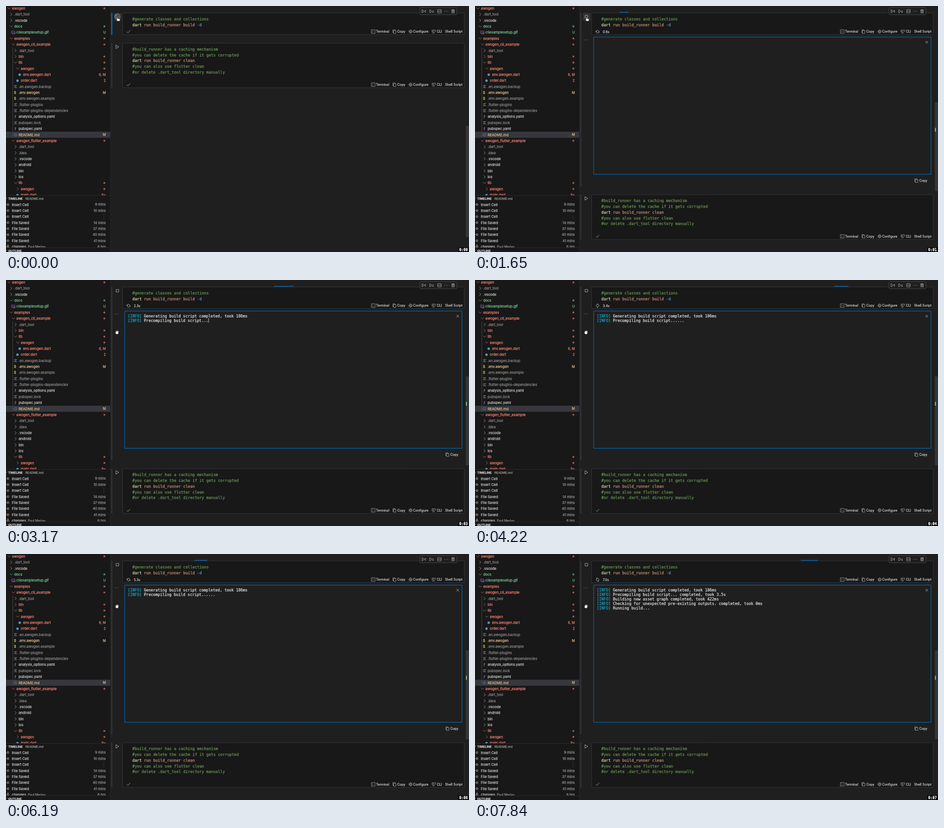
Recreate the animation shown at these times as an HTML page with a canvas. Size 1026 by 546 pixels, loop 7990 ms.

```html
<!DOCTYPE html>
<html lang="en">
<head>
<meta charset="utf-8">
<title>Notebook run</title>
<style>
html, body { margin: 0; width: 100%; height: 100%; overflow: hidden; background: #1f1f1f; }
canvas { display: block; width: 1026px; height: 546px; }
</style>
</head>
<body>
<canvas id="stage" width="1026" height="546"></canvas>
<script>
const ctx = document.getElementById('stage').getContext('2d');
const LOOP = 7990, START = 818, BAR_START = 1305;
const SANS = 'Inter, "Open Sans", sans-serif';
const MONO = '"DejaVu Sans Mono", monospace';
const FG = '#cccccc', DIM = '#8c8c8c', RED = '#f88070', GREEN = '#73c991',
  GOLD = '#e2c08d', BLUE = '#0078d4', PURPLE = '#a074c4', SIDE = '#181818', EDITOR = '#1f1f1f',
  SLIDER = '#353535';

// Icons live on a 16 unit grid.
const circle = r => `M${8 - r} 8a${r} ${r} 0 1 1 ${2 * r} 0a${r} ${r} 0 1 1 ${-2 * r} 0`;
const teeth = Array.from({ length: 8 }, (_, i) => {
  const c = Math.cos(i * Math.PI / 4), s = Math.sin(i * Math.PI / 4);
  return `M${8 + 5 * c} ${8 + 5 * s}L${8 + 7 * c} ${8 + 7 * s}`;
}).join('');
const ICONS = {
  play: 'M3.2 2L13 8L3.2 14Z',
  stop: 'M3.5 3.5h9v9h-9z',
  check: 'M2.5 8.5L6 12L13.5 3.5',
  sync: 'M2.5 8a5.5 5.5 0 0 0 10.2 2.4M.5 9.2l2-2 2 2M13.5 8a5.5 5.5 0 0 0-10.2-2.4M11.5 6.8l2 2 2-2',
  terminal: 'M1.5 1.5h13v13h-13zM5 5l3 3-3 3',
  copy: 'M5 4.5h8.5v10h-8.5zM5 12H2.5V1.5H10V4.5',
  gear: circle(2) + circle(5) + teeth,
  cli: 'M14.5 7V2.5h-13v7h6M4 6h5M3.5 13.5h4M8 13l5.5-5.5M8 13l1 1.5',
  runUp: 'M2 2.5l8 5.5-8 5.5zM13.5 13V5M11.5 7l2-2 2 2',
  runDown: 'M2 2.5l8 5.5-8 5.5zM13.5 5v8M11.5 11l2 2 2-2',
  split: 'M2 2h12v12h-12zM2 8h12',
  trash: 'M2.5 4h11M6 4V2h4v2M3.5 4v10h9V4M6.5 6.5v5M9.5 6.5v5',
  close: 'M4 4l8 8M12 4l-8 8',
  dots: 'M2.5 8h.01M8 8h.01M13.5 8h.01',
  right: 'M5.5 3l5 5-5 5',
  down: 'M3 5.5l5 5 5-5',
  info: circle(5.5) + 'M8 7.2v4M8 4.6v.6',
  lines: 'M4 4h8.5M4 8h6M4 12h8.5',
  image: 'M2 3h11v8h-11zM5 13.5h9.5v-7M4 9l3-3 3 3',
  ring: circle(3.4),
  commit: circle(3.4) + 'M8 4.6V0M8 11.4V16'
};
for (const k in ICONS) ICONS[k] = new Path2D(ICONS[k]);

function icon(name, x, y, color = FG, width = 1.3, angle = 0) {
  ctx.save();
  ctx.translate(x, y);
  ctx.rotate(angle);
  ctx.scale(.607, .607);
  ctx.translate(-8, -8);
  ctx.strokeStyle = color;
  ctx.lineWidth = width;
  ctx.lineCap = ctx.lineJoin = 'round';
  ctx.stroke(ICONS[name]);
  ctx.restore();
}

// Text centred on y, slightly thickened; returns the x where it ends.
function text(str, x, y, color = FG, size = 7.8, family = SANS, weight = 400, align = 'left') {
  ctx.font = `${weight} ${size}px ${family}`;
  ctx.textAlign = align;
  ctx.fillStyle = ctx.strokeStyle = color;
  ctx.lineWidth = .25;
  ctx.lineJoin = 'round';
  ctx.fillText(str, x, y + size * .36);
  ctx.strokeText(str, x, y + size * .36);
  return x + ctx.measureText(str).width;
}

function box(x, y, w, h, fill, stroke, radius = 0) {
  ctx.beginPath();
  ctx.roundRect(x, y, w, h, radius);
  if (fill) { ctx.fillStyle = fill; ctx.fill(); }
  if (stroke) { ctx.strokeStyle = stroke; ctx.lineWidth = 1; ctx.stroke(); }
}

function dot(x, y, r, color) {
  ctx.fillStyle = color;
  ctx.beginPath();
  ctx.arc(x, y, r, 0, 7);
  ctx.fill();
}

function clipped(x, y, w, h, draw) {
  ctx.save();
  ctx.beginPath();
  ctx.rect(x, y, w, h);
  ctx.clip();
  draw();
  ctx.restore();
}

// depth, icon, label, colour, status
const TREE = [
  [0, 'down', 'awogen', RED, '•'],
  [1, 'right', '.dart_tool', DIM],
  [1, 'right', '.vscode', FG],
  [1, 'down', 'docs', GREEN, '•'],
  [2, 'image', 'cliexamplesetup.gif', GREEN, 'U'],
  [1, 'down', 'examples', RED, '•'],
  [2, 'down', 'awogen_cli_example', RED, '•'],
  [3, 'right', '.dart_tool', DIM],
  [3, 'right', 'bin', RED, '•'],
  [3, 'down', 'lib', RED, '•'],
  [4, 'down', 'awogen', RED, '•'],
  [5, 'dart', 'env.awogen.dart', RED, '6, M'],
  [4, 'dart', 'order.dart', RED, '2'],
  [3, 'lines', '.en.awogen.backup', DIM],
  [3, '$', '.env.awogen', GOLD, 'M'],
  [3, '$', '.env.awogen.example', DIM],
  [3, 'lines', '.flutter-plugins', DIM],
  [3, 'lines', '.flutter-plugins-dependencies', DIM],
  [3, '!', 'analysis_options.yaml', FG],
  [3, 'lines', 'pubspec.lock', DIM],
  [3, '!', 'pubspec.yaml', FG],
  [3, 'info', 'README.md', GOLD, 'M'],
  [2, 'down', 'awogen_flutter_example', RED, '•'],
  [3, 'right', '.dart_tool', DIM],
  [3, 'right', '.idea', DIM],
  [3, 'right', '.vscode', FG],
  [3, 'right', 'android', FG],
  [3, 'right', 'bin', FG],
  [3, 'right', 'ios', FG],
  [3, 'down', 'lib', RED, '•'],
  [4, 'right', 'awogen', RED, '•'],
  [4, 'dart', 'main.dart', RED, '9+']
];
const ICON_COLORS = { lines: FG, info: '#519aba', image: PURPLE };

function treeRow([depth, kind, label, color, status], i) {
  const x = 13.3 + 4.87 * depth, y = 5.2 + 13.36 * i;
  if (label === 'README.md') box(0, y - 6.7, 231, 13.4, '#37373d');
  if (kind === 'dart') dot(x - 7.3, y + .3, 2.7, '#519aba');
  else if (kind === '$') text('$', x - 7.8, y, '#cbcb41', 8, SANS, 400, 'center');
  else if (kind === '!') text('!', x - 7.5, y, PURPLE, 9, SANS, 'italic 700', 'center');
  else if (ICON_COLORS[kind]) icon(kind, x - 6.8, y, ICON_COLORS[kind], 1.2);
  else icon(kind, x - 6.6, y, color === RED || color === GREEN ? color : FG, 1.2);
  text(label, x, y, color);
  if (status === '•') {
    ctx.globalAlpha = .6;
    dot(218, y, 2.2, color);
    ctx.globalAlpha = 1;
  } else if (status) text(status, 221, y, color, 7.3, SANS, 400, 'right');
}

const TIMELINE = [['Insert Cell', '9 mins'], ['Insert Cell', '10 mins'], ['Insert Cell', ''],
  ['File Saved', '14 mins'], ['File Saved', '37 mins'], ['File Saved', '40 mins'],
  ['File Saved', '41 mins'], ['changes', '6 hrs']];

function sidebar() {
  box(0, 0, 231, 546, SIDE);
  clipped(0, 0, 231, 420, () => {
    TREE.forEach(treeRow);
    box(14.6, 92, .8, 200, '#585858');
  });
  box(0, 420.3, 231, .8, '#2f2f2f');
  icon('down', -1, 427.5);
  text('TIMELINE', 5, 427.7, FG, 6.8, SANS, 700);
  text('README.md', 43, 427.7, '#9a9a9a', 6.75);
  clipped(0, 433, 231, 103, () => TIMELINE.forEach(([label, when], i) => {
    const y = 440.7 + 13.36 * i, last = i === 7;
    icon(last ? 'commit' : 'ring', 4.3, y, FG, 1.6);
    const end = text(label, 13, y);
    if (last) text('Paul Merlan', end + 4, y + .2, '#969696', 7);
    text(when, 221, y, '#9a9a9a', 7.6, SANS, 400, 'right');
    if (!when) box(216.5, y - 6.5, .8, 13, '#3c3c3c');
  }));
  box(0, 536, 231, .8, '#2f2f2f');
  icon('down', -1, 543);
  text('OUTLINE', 5, 543.2, FG, 6.8, SANS, 700);
  box(231, 0, .7, 546, '#2b2b2b');
}

const command = (verb, flag = '') =>
  [['dart ', '#dcdcaa'], ['run build_runner ' + verb, '#ce9178'], [flag, '#569cd6']];
const note = s => [['#' + s, '#6a9955']];
const BUILD = [note('generate classes and collections'), command('build ', '-d')];
const CLEAN = [note('build_runner has a caching mechanism'),
  note('you can delete the cache if it gets corrupted'), command('clean'),
  note('you can also use flutter clean'), note('or delete .dart_tool directory manually')];

function cell(top, height, code) {
  box(258.5, top, 757, height, SIDE, '#35353a');
  code.forEach((line, i) => {
    let x = 280;
    for (const [s, color] of line) x = text(s, x, top + 13.4 + 12.75 * i, color, 8.52, MONO);
  });
  const y = top + height - 6.8;
  [['terminal', 814, 'Terminal', 820], ['copy', 860.7, 'Copy', 867],
    ['gear', 896.5, 'Configure', 902.3], ['cli', 948, 'CLI', 954.7]].forEach(([name, ix, label, x]) => {
    icon(name, ix, y, FG, 1.1);
    text(label, x, y, FG, 7.2);
  });
  text('Shell Script', 973, y, FG, 7.2);
}

// time, line number, log message
const LOG = [
  [2700, 0, 'Generating build script...'],
  [2890, 0, 'Generating build script completed, took 186ms'],
  [2900, 1, 'Precompiling build script...'],
  [3900, 1, 'Precompiling build script......'],
  [6450, 1, 'Precompiling build script... completed, took 3.5s'],
  [6500, 2, 'Building new asset graph...'],
  [6925, 2, 'Building new asset graph completed, took 422ms'],
  [6930, 3, 'Checking for unexpected pre-existing outputs. completed, took 0ms'],
  [7080, 4, 'Running build...']
];

function output(t) {
  box(263, 69, 747.5, 304.5, EDITOR, BLUE);
  icon('dots', 245, 75, FG, 1.7);
  icon('close', 1001, 80.3);
  icon('copy', 978, 387.6, FG, 1.1);
  text('Copy', 984.5, 387.6, FG, 7.2);
  const lines = [];
  for (const [at, row, msg] of LOG) if (t >= at) lines[row] = msg;
  let x = 269.6;
  lines.forEach((msg, i) => {
    const y = 80.3 + 9.8 * i;
    x = text('[INFO] ', 270, y, '#11a8cd', 8.47, MONO);
    x = text(msg, x, y, '#e5e5e5', 8.47, MONO);
  });
  if (t % 1200 >= 660) box(x, 75 + 9.8 * Math.max(0, lines.length - 1), .9, 10, '#e5e5e5');
}

function progress(t) {
  if (t < BAR_START) return;
  const p = (t - BAR_START) % 4000 / 4000, w = 757 * .02;
  const width = w * (1 + 2 * (1 - Math.abs(2 * p - 1)));
  const mid = 258 + w / 2 + p * 49.5 * w;
  clipped(258, 12, 758, 4, () => box(mid - width / 2, 13.2, width, 1.3, BLUE));
}

const POINT = new Path2D('M-1.8-4.2q1-1 1.8 0v3l4 1.1q1 .4.8 1.6l-.8 3.5h-4.8l-2.8-3.4q-.4-1.2.8-1l1 .7z');
const GRAB = new Path2D('M-2.6.2l-.7-2.8q.7-1 1.4 0l.5 1V-4q.8-1 1.5 0l.2 2 .4-2.1q1-.8 1.4.1v2.3l.6-1.3q1-.6 1.3.3L3.4 1.6l-.9 2.9h-4l-2.6-3.3q-.3-1.3.8-1z');

function mouse(t) {
  const k = Math.min(1, Math.max(0, (t - 1650) / 700)), e = k * k * (3 - 2 * k);
  const settle = Math.min(1, Math.max(0, (t - 2700) / 300));
  const hand = e > .06 ? GRAB : POINT;
  ctx.save();
  ctx.translate(247.9 - 2 * e, 28.7 + 87.8 * e - .6 * settle);
  ctx.fillStyle = '#fff';
  ctx.fill(hand);
  ctx.strokeStyle = '#000';
  ctx.lineWidth = .7;
  ctx.stroke(hand);
  ctx.restore();
}

function draw(t) {
  const running = t >= START, shift = running ? 336.5 : 0;
  box(0, 0, 1026, 546, EDITOR);
  sidebar();

  box(233.3, 15, 2.2, running ? 385 : 49, running ? '#37373d' : BLUE);
  box(233.3, 82 + shift, 2.2, 100, '#37373d');
  cell(15.5, 48, BUILD);
  cell(82.4 + shift, 99, CLEAN);
  icon('check', 271.5, 174.8 + shift);
  icon('play', 247, 90.6 + shift);

  if (t < 1720) box(239, 15.5, 17, 17.5, '#313233', null, 3);
  if (running) {
    icon('stop', 247, 23.7);
    icon('sync', 271.6, 57, FG, 1.2, (t - START) / 1500 * 2 * Math.PI);
    text((Math.floor((t - START) / 100) / 10).toFixed(1) + 's', 283.3, 57, FG, 7.2);
    output(t);
  } else {
    icon('play', 247, 23.7);
    if (t < 150) {
      ctx.strokeStyle = FG;
      ctx.lineWidth = .8;
      ctx.beginPath();
      ctx.arc(246.7, 23.4, 5.8, 0, 7);
      ctx.stroke();
    }
    icon('check', 271.5, 57);
  }
  progress(t);

  box(917.5, 3.5, 82, 16, EDITOR, '#454545', 2);
  [['runUp', 926], ['runDown', 943], ['split', 960.7], ['dots', 975.6], ['trash', 990.7]]
    .forEach(([name, x]) => icon(name, x, 11.6, FG, name === 'dots' ? 1.8 : 1.2));

  if (running) {
    box(1019, 214, 7, 197, SLIDER);
    box(1019, 270.5, 2.4, 8.5, '#86b37c');
  } else box(1019, 266, 7, 247, SLIDER);

  box(1002, 536, 24, 10, '#000');
  text('0:0' + Math.floor(t / 1000), 1013.8, 541, '#fff', 8, MONO, 700, 'center');
  mouse(t);
}

const begin = performance.now();
function frame(now) {
  draw(Math.max(0, now - begin) % LOOP);
  requestAnimationFrame(frame);
}
frame(begin);
</script>
</body>
</html>
```
